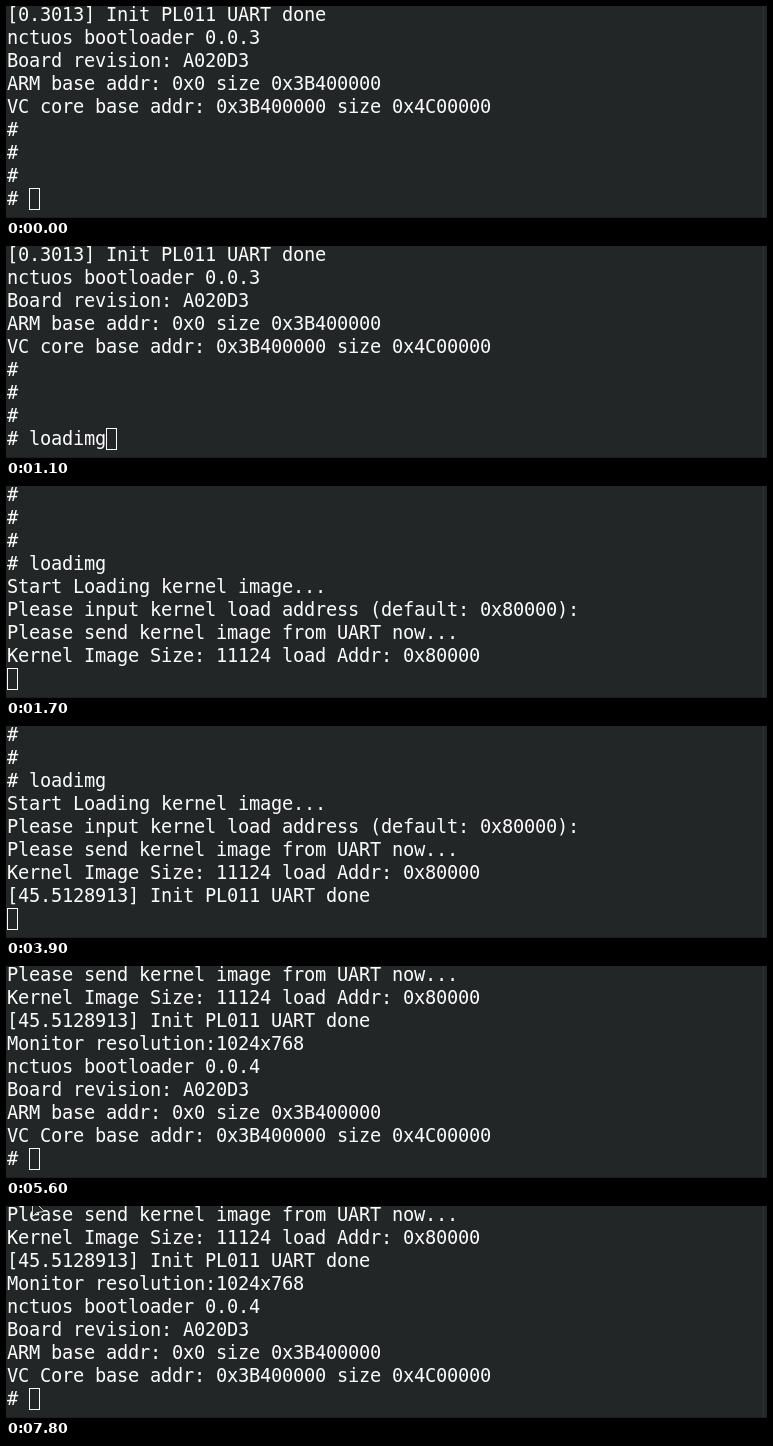
These frames come from a looping animation (761 px wide and 212 px high, 8100 ms). An HTML page with a canvas:

```html
<!DOCTYPE html>
<html lang="en">
<head>
<meta charset="utf-8">
<title>Bootloader session</title>
<style>
  html, body { margin: 0; width: 100%; height: 100%; overflow: hidden; background: #232627; }
  canvas { display: block; width: 761px; height: 212px; }
</style>
</head>
<body>
<canvas id="stage" width="761" height="212"></canvas>
<script>
const ctx = document.getElementById('stage').getContext('2d');
const LOOP = 8100, ROWS = 9;
const CELL_W = 11, CELL_H = 23, LEFT = 1, TOP = -2, BASELINE = 17;
const BACK = '#232627', INK = '#fcfcfc';

const log = [
  '[0.3013] Init PL011 UART done',
  'nctuos bootloader 0.0.3',
  'Board revision: A020D3',
  'ARM base addr: 0x0 size 0x3B400000',
  'VC core base addr: 0x3B400000 size 0x4C00000',
  '#', '#', '#',
  '# loadimg',
  'Start Loading kernel image...',
  'Please input kernel load address (default: 0x80000):',
  'Please send kernel image from UART now...',
  'Kernel Image Size: 11124 load Addr: 0x80000',
  '[45.5128913] Init PL011 UART done',
  'Monitor resolution:1024x768',
  'nctuos bootloader 0.0.4',
  'Board revision: A020D3',
  'ARM base addr: 0x0 size 0x3B400000',
  'VC Core base addr: 0x3B400000 size 0x4C00000',
  '# '
];

// Each step: start time, line holding the caret, caret column.
const steps = [
  [0, 8, 2], [500, 8, 3], [700, 8, 5], [900, 8, 7], [1100, 8, 9],
  [1300, 12, 0], [1700, 13, 0], [3900, 14, 0], [4000, 15, 0], [5600, 19, 2]
];

// Each pointer: start time, end time, shape, position.
const pointers = [
  [7000, 7100, drawBeam, 434, 99],
  [7100, 7200, drawBeam, 195, 5],
  [7700, 7800, drawArrow, 26, -10],
  [7800, 8100, drawArrow, 26, -7]
];

function drawText(text, row) {
  const y = TOP + row * CELL_H + BASELINE;
  [...text].forEach((char, col) => ctx.fillText(char, LEFT + col * CELL_W, y));
}

function drawCaret(col) {
  ctx.strokeStyle = INK;
  ctx.lineWidth = 1;
  ctx.strokeRect(LEFT + col * CELL_W + 0.5, 182.5, CELL_W - 1, 21);
}

function drawBeam(x, y) {
  const bars = [[0, 0, 9, 3], [3, 0, 3, 18], [0, 15, 9, 3]];
  ctx.fillStyle = INK;
  bars.forEach(([dx, dy, w, h]) => ctx.fillRect(x + dx, y + dy, w, h));
  ctx.fillStyle = BACK;
  bars.forEach(([dx, dy, w, h]) => ctx.fillRect(x + dx + 1, y + dy + 1, w - 2, h - 2));
}

function drawArrow(x, y) {
  ctx.beginPath();
  [[0, 0], [0, 17], [4.5, 13], [12, 12]].forEach(([dx, dy]) => ctx.lineTo(x + dx + 0.5, y + dy + 0.5));
  ctx.closePath();
  ctx.fillStyle = BACK;
  ctx.fill();
  ctx.strokeStyle = '#d5d6d6';
  ctx.lineWidth = 1;
  ctx.stroke();
}

function drawFrame() {
  ctx.fillStyle = BACK;
  ctx.fillRect(0, 0, 761, 212);
  ctx.fillStyle = '#2b3439';
  ctx.fillRect(757, 0, 1, 212);
  ctx.fillStyle = '#1d2022';
  ctx.fillRect(0, 211, 761, 1);
}

function render(t) {
  const [, last, col] = steps.filter(([start]) => start <= t).pop();
  drawFrame();
  ctx.font = '18.667px "DejaVu Sans Mono", monospace';
  ctx.fillStyle = INK;
  for (let row = 0; row < ROWS; row++) {
    const line = log[last - ROWS + 1 + row];
    drawText(row === ROWS - 1 ? line.slice(0, col) : line, row);
  }
  drawCaret(col);
  for (const [start, end, draw, x, y] of pointers) {
    if (t >= start && t < end) draw(x, y);
  }
}

const origin = performance.now();
function tick() {
  render((performance.now() - origin) % LOOP);
  requestAnimationFrame(tick);
}
tick();
</script>
</body>
</html>
```
